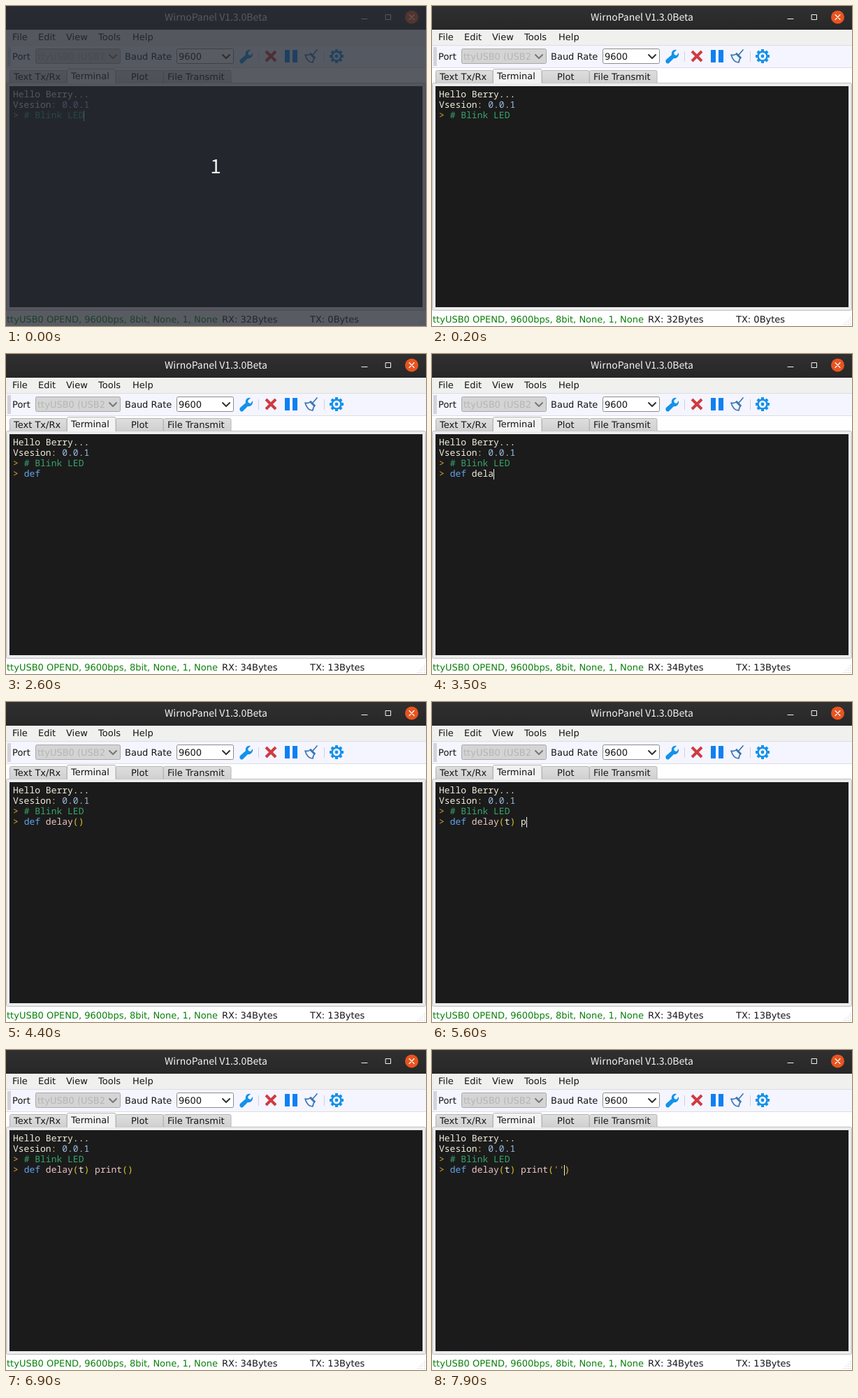
Write an HTML page that moves like this. It is 601 px wide and 459 px high and loops after 8000 ms.

```html
<!DOCTYPE html>
<html lang="en">
<head>
<meta charset="utf-8">
<title>Serial terminal</title>
<style>
  html, body { margin: 0; width: 100%; height: 100%; overflow: hidden; background: #fff; }
  svg { display: block; width: 601px; height: 459px; }
  text { font: 13px "DejaVu Sans", sans-serif; fill: #151515; white-space: pre; text-rendering: geometricPrecision; }
  .title { font: 500 14px "Noto Sans CJK SC", "Noto Sans CJK JP", "Noto Sans", sans-serif; fill: #f4f4f4; }
  .count { font: 28px "Noto Sans CJK SC", "Noto Sans CJK JP", "Noto Sans", sans-serif; fill: #f0f0f0; }
  .mono text { font: 13px "Noto Sans Mono", "Liberation Mono", monospace; fill: #f2eedb; }
  .line { fill: none; stroke-linecap: round; stroke-linejoin: round; }
</style>
</head>
<body>
<svg viewBox="0 0 601 459" xmlns="http://www.w3.org/2000/svg">
  <defs>
    <linearGradient id="bar" x2="0" y2="1"><stop stop-color="#303030"/><stop offset="1" stop-color="#272727"/></linearGradient>
    <linearGradient id="tab" x2="0" y2="1"><stop stop-color="#dedede"/><stop offset="1" stop-color="#d0d0d0"/></linearGradient>
    <clipPath id="port"><rect x="44" y="62" width="98" height="20"/></clipPath>
  </defs>
  <rect width="601" height="459" fill="#fff"/>

  <!-- title bar -->
  <rect width="601" height="34" fill="url(#bar)"/>
  <text class="title" x="300.5" y="21" text-anchor="middle">WirnoPanel V1.3.0Beta</text>
  <path d="M509 18.5h8M543.5 12.5h7v7h-7z" class="line" stroke="#f2f2f2"/>
  <circle cx="580.5" cy="16" r="9.5" fill="#e95420"/>
  <path d="M577 12.5l7 7m0-7l-7 7" class="line" stroke="#fff" stroke-width="1.2"/>

  <!-- menu and tool bar -->
  <rect y="34" width="601" height="22" fill="#f0f0ee"/>
  <g id="menu"></g>
  <rect y="56" width="601" height="33" fill="#f5f5ff"/>
  <path d="M0 56.5h601M0 88.5h601" stroke="#dcdce2"/>
  <rect x="2" y="59" width="5" height="27" fill="#d3d3d8"/>
  <text x="9" y="77">Port</text>
  <rect x="42.5" y="61.5" width="121" height="21" rx="2" fill="#d4d4d4" stroke="#a9a9a9"/>
  <text x="45" y="77" style="fill:#b5b5b5" clip-path="url(#port)">ttyUSB0 (USB2</text>
  <path d="M148 70l5 5 5-5" class="line" stroke="#777" stroke-width="2"/>
  <text x="170" y="77">Baud Rate</text>
  <rect x="244.5" y="61.5" width="81" height="21" rx="2" fill="#fff" stroke="#8c8c8c"/>
  <text x="247" y="77">9600</text>
  <path d="M310 70l5 5 5-5" class="line" stroke="#333" stroke-width="2"/>
  <path d="M361.5 65v15M455.5 65v15" stroke="#d0d0d8"/>

  <g fill="#1292ea">
    <path d="M335 77l8-7c-1-4 2-8 7-7l-4 4 1 3 3 1 3-4c1 5-3 9-7 8l-7 7c-3 2-6-2-4-5z"/>
    <path d="M399 63h7v18h-7zM410 63h7v18h-7z" fill="#0d80f2"/>
    <circle cx="473" cy="72" r="6.5" fill="none" stroke="#1292ea" stroke-width="2.6"/>
    <circle cx="473" cy="72" r="2.4"/>
    <g id="teeth"></g>
  </g>
  <path d="M372 65l14 14m0-14l-14 14" class="line" stroke="#cf3b41" stroke-width="4" style="stroke-linecap:butt"/>
  <path d="M445 63l-6 7M428 70c3 1 6 0 8-2l6 6c-2 2-3 4-3 7-6 0-9-4-11-11z" class="line" stroke="#3a78b5" stroke-width="1.7"/>
  <path d="M435 68l7 7" stroke="#3a78b5" stroke-width="2.6"/>

  <!-- tabs and pane -->
  <rect x=".5" y="110.5" width="600" height="326" rx="2" fill="#ececec" stroke="#bfbfbf"/>
  <g id="tabs"></g>
  <rect x="5" y="115" width="591" height="317" fill="#1b1b1b"/>
  <g class="mono">
    <text id="l0" x="10" y="131"></text>
    <text id="l1" x="10" y="146"></text>
    <text id="l2" x="10" y="161"></text>
    <text id="l3" x="10" y="176"></text>
  </g>
  <rect id="caret" width="1" height="15" fill="#f4f4f4"/>

  <!-- status bar -->
  <text x="1" y="454" style="fill:#0a800a">ttyUSB0 OPEND, 9600bps, 8bit, None, 1, None</text>
  <text id="rx" x="309" y="454"></text>
  <text id="tx" x="435" y="454"></text>
  <g id="grip" fill="#b8b8b8"></g>

  <g id="shade">
    <rect width="601" height="459" fill="rgb(38,43,51)" opacity=".77"/>
    <text class="count" x="300" y="240" text-anchor="middle">1</text>
  </g>
</svg>
<script>
const LOOP = 8000, CHAR = 7.8;
const NS = "http://www.w3.org/2000/svg";
const $ = id => document.getElementById(id);

function add(parent, tag, attrs, text = "") {
  const el = document.createElementNS(NS, tag);
  for (const k in attrs) el.setAttribute(k, attrs[k]);
  el.textContent = text;
  parent.append(el);
  return el;
}

[["File", 9], ["Edit", 46], ["View", 86], ["Tools", 132], ["Help", 181]]
  .forEach(([name, x]) => add($("menu"), "text", { x, y: 49 }, name));

[["Text Tx/Rx", 5, 87, 11], ["Terminal", 87, 157, 93], ["Plot", 157, 225, 179], ["File Transmit", 225, 322, 231]]
  .forEach(([name, left, right, x], i) => {
    const on = i === 1, top = on ? 90.5 : 92.5, foot = on ? 111 : 110.5;
    add($("tabs"), "path", {
      d: `M${left + .5} ${foot}V${top + 2}q0-2 2-2H${right - 2}q2 0 2 2V${foot}`,
      fill: on ? "#f2f2f2" : "url(#tab)", stroke: "#b6b6b6"
    });
    add($("tabs"), "text", { x, y: on ? 105 : 106 }, name);
  });

for (let a = 0; a < 360; a += 45)
  add($("teeth"), "rect", { x: 471, y: 62, width: 4, height: 4, transform: `rotate(${a} 473 72)` });

for (let r = 0; r < 4; r++)
  for (let c = 0; c <= r; c++)
    add($("grip"), "rect", { x: 598 - c * 3, y: 447 + r * 3, width: 1, height: 1 });

const RULES = [
  [/^#.*/, "#38a56c"],
  [/^>/, "#e3a32f"],
  [/^def\b/, "#62a5ea"],
  [/^\w+(?=\()/, "#ecc6c4"],
  [/^\d[\d.]*/, "#9dbbdd"],
  [/^[()]/, "#dcc22c"],
  [/^'/, "#d19a54"],
  [/^:/, "#dfb050"],
  [/^(\w+|.)/, "#f2eedb"]
];

function paint(el, code) {
  if (el.dataset.code === code) return;
  el.dataset.code = code;
  el.textContent = "";
  while (code) {
    const [re, color] = RULES.find(([r]) => r.test(code));
    const word = code.match(re)[0];
    add(el, "tspan", { style: `fill:${color}` }, word);
    code = code.slice(word.length);
  }
}

// time, text of the input line, caret column (-1 hides it), caret row
const STEPS = [
  [0, "", 13, 2],
  [200, "", -1],
  [800, "", 13, 2],
  [1300, "", -1],
  [1500, "", 0],
  [1600, "> ", -1],
  [2100, "> d", 3],
  [2400, "> def", 5],
  [2600, "> def", -1],
  [2900, "> def ", 6],
  [3100, "> def d", 7],
  [3200, "> def de", 8],
  [3300, "> def del", 9],
  [3500, "> def dela", 10],
  [3700, "> def delay", 11],
  [3900, "> def delay()", 12],
  [4400, "> def delay()", -1],
  [4600, "> def delay(t)", 13],
  [4900, "> def delay(t)", 14],
  [5100, "> def delay(t) ", 15],
  [5600, "> def delay(t) p", 16],
  [5900, "> def delay(t) pr", 17],
  [6000, "> def delay(t) pri", 18],
  [6100, "> def delay(t) prin", 19],
  [6300, "> def delay(t) print", 20],
  [6400, "> def delay(t) print()", 21],
  [6900, "> def delay(t) print()", -1],
  [7400, "> def delay(t) print()", 21],
  [7500, "> def delay(t) print(", 21],
  [7800, "> def delay(t) print('')", 22],
  [7900, "> def delay(t) print('')", 23]
];

paint($("l0"), "Hello Berry...");
paint($("l1"), "Vsesion: 0.0.1");
paint($("l2"), "> # Blink LED");

let last;
function draw(now) {
  const t = now % LOOP;
  const step = STEPS.findLast(s => s[0] <= t);
  if (step !== last) {
    last = step;
    const [at, code, col, row = 3] = step;
    paint($("l3"), code);
    const caret = $("caret");
    caret.style.display = col < 0 ? "none" : "";
    caret.setAttribute("x", Math.round(10 + col * CHAR));
    caret.setAttribute("y", 120 + row * 15);
    $("rx").textContent = `RX: ${at < 1600 ? 32 : 34}Bytes`;
    $("tx").textContent = `TX: ${at < 1500 ? 0 : 13}Bytes`;
    $("shade").style.display = at < 200 ? "" : "none";
  }
}

const start = performance.now();
function tick() {
  draw(performance.now() - start);
  requestAnimationFrame(tick);
}
tick();
</script>
</body>
</html>
```
